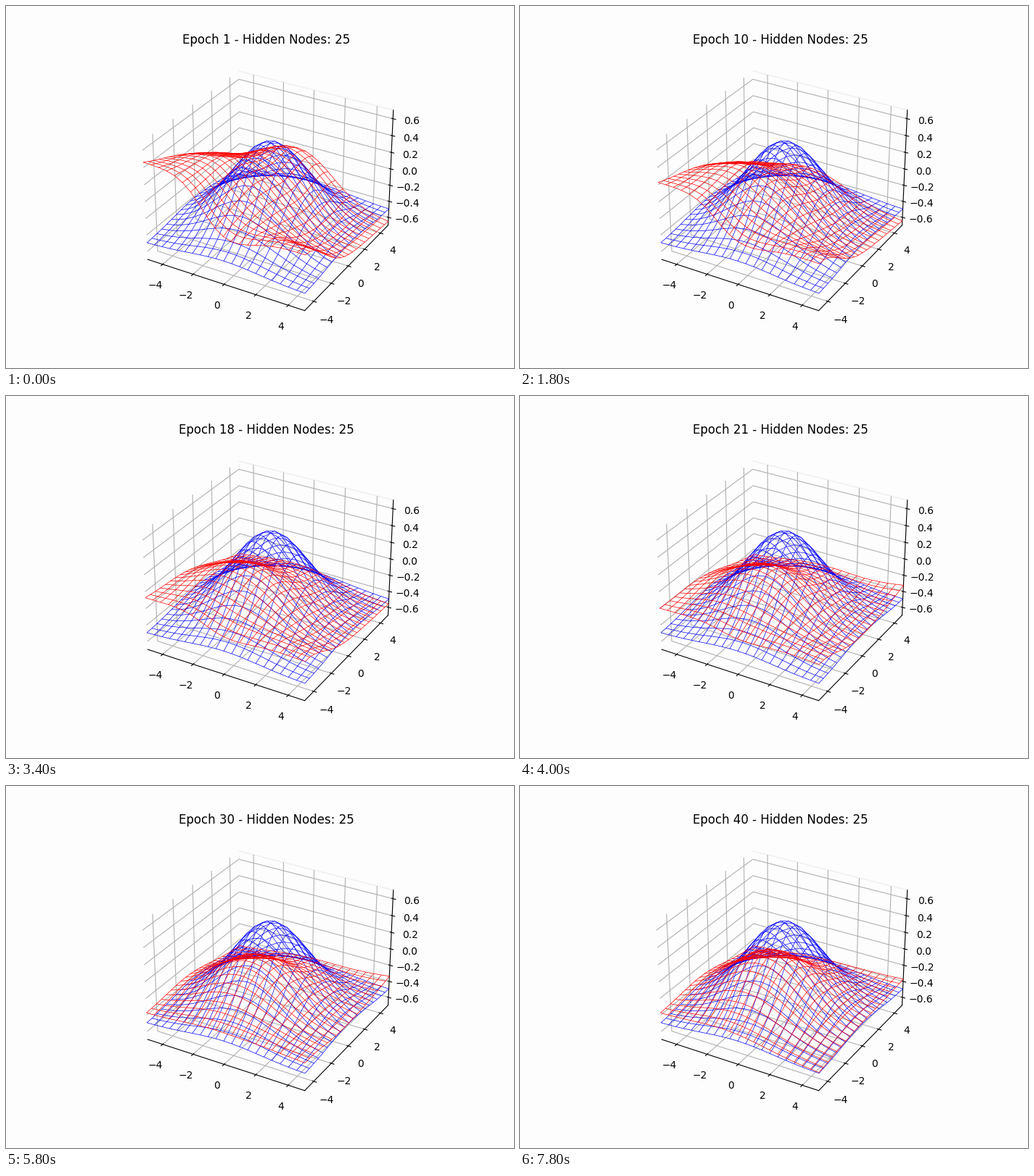
Write a matplotlib script that moves like this. It is 700 px wide and 500 px high and loops after 8000 ms.

```python
import numpy as np
import matplotlib.pyplot as plt
from matplotlib.animation import FuncAnimation

EPOCHS = 40
PAPER = "#fdfdfd"
axis = np.arange(-5, 5.5, 0.5)
X, Y = np.meshgrid(axis, axis)
U, V = (X + 5) / 10, (Y + 5) / 10


def hill(x0, y0, spread):
    return np.exp(-((X - x0)**2 + (Y - y0)**2) / spread)


def step(x0, rate):
    """Soft step along x, rising for a positive rate."""
    return 1 / (1 + np.exp(-rate * (X - x0)))


TARGET = hill(0, 0, 10) - 0.5
TRAINED = 0.6 * hill(-0.6, -0.6, 11) - 0.44 + 0.05 * X * Y / 25

# Errors of the untrained guess, each fading at its own pace
LEFT = 0.84 * step(-1.3, -1.3) * (1 - 0.92 * V)
RIGHT = step(1.5, 1) * (0.62 * np.exp(-((Y + 5) / 3)**2) - 0.17)
BACK = 0.4 * hill(-0.7, 4.2, 8)
DENT = -0.25 * ((1 - X**2 / 25) * (1 - Y**2 / 25))**2
CORNER = (U * V)**2


def surface(epoch):
    n = epoch - 1
    slow = 1 - n / (EPOCHS - 1)
    quick = 1 - min(n / 24, 1)**1.3
    swing = np.exp(-n / 14) * (0.25 - 0.5 * np.cos(np.pi * (n - 1) / 4))
    return (TRAINED + quick * LEFT + slow * (RIGHT + DENT)
            + np.exp(-n / 8) * BACK + swing * CORNER)


def wires(z):
    grid = np.dstack([X, Y, z])
    return list(grid) + list(grid.transpose(1, 0, 2))


fig = plt.figure(figsize=(7, 5), dpi=100, facecolor=PAPER)
ax = fig.add_subplot(projection="3d", facecolor=PAPER)
ax.set_xlim(-5, 5)
ax.set_ylim(-5, 5)
ax.set_zlim(-0.7, 0.7)
for side in (ax.xaxis, ax.yaxis, ax.zaxis):
    side.set_pane_color(PAPER)
ax.yaxis.pane.set_edgecolor("#efefef")

goal = ax.plot_wireframe(X, Y, TARGET, color="blue", linewidth=0.5)
guess = ax.plot_wireframe(X, Y, surface(1), color="red", linewidth=0.5)
title = ax.set_title("")


def draw(i):
    epoch = i + 1
    guess.set_segments(wires(surface(epoch)))
    title.set_text(f"Epoch {epoch} - Hidden Nodes: 25")
    return guess, title


anim = FuncAnimation(fig, draw, frames=EPOCHS, interval=200, repeat=True)
plt.show()
```
